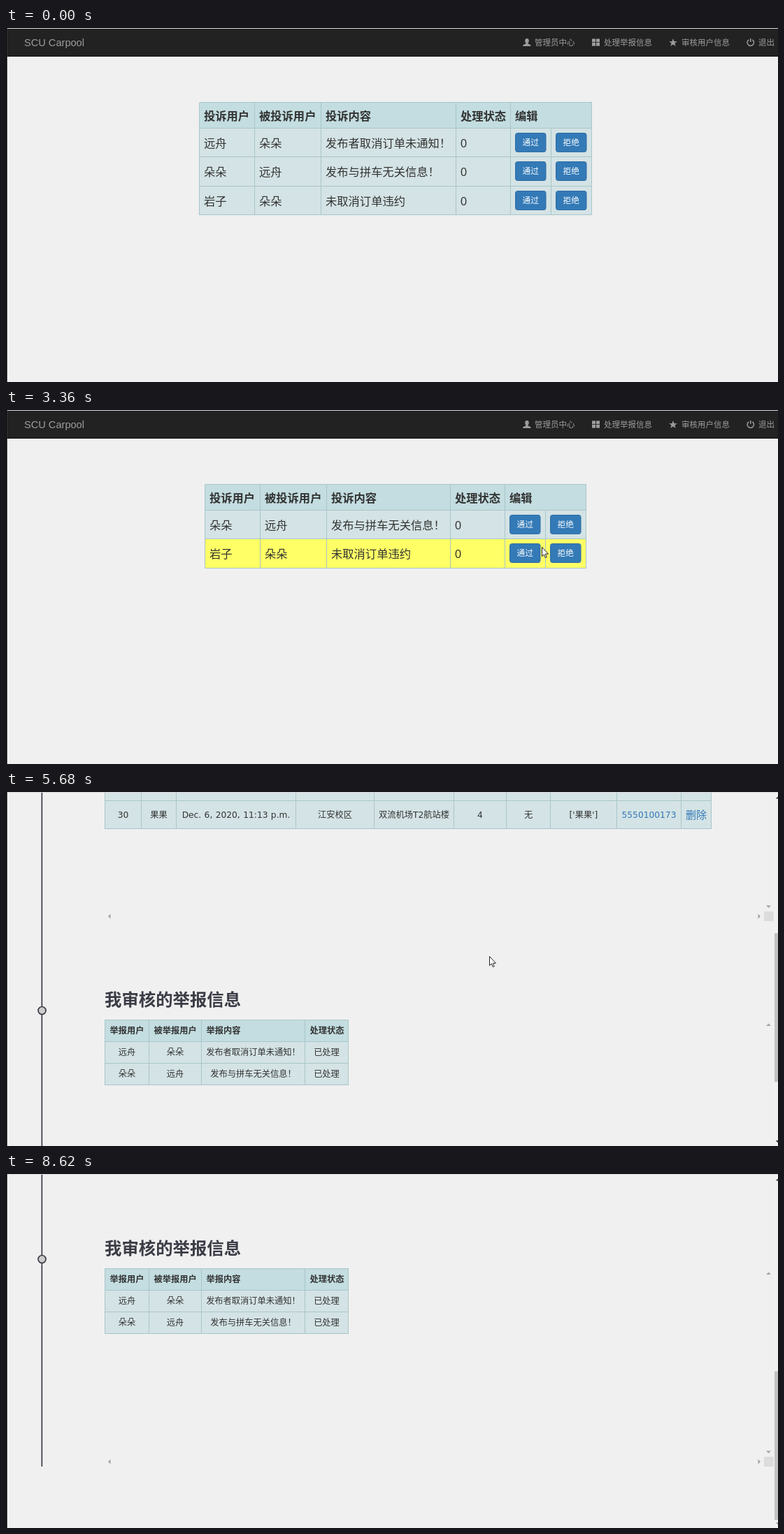
Write an HTML page that moves like this. It is 1104x507 px and loops after 9.15 s.

```html
<!DOCTYPE html>
<html lang="zh-CN">
<head>
<meta charset="utf-8">
<title>SCU Carpool</title>
<style>
html, body { margin: 0; width: 100%; height: 100%; overflow: hidden; background: #f0f0f0; }
svg { display: block; width: 1104px; height: 507px; }
text { white-space: pre; }
.review { font-family: "Liberation Sans", "Noto Sans CJK SC", sans-serif; }
.center { font-family: "DejaVu Sans", "Noto Sans CJK SC", sans-serif; }
.crisp { shape-rendering: crispEdges; }
</style>
</head>
<body>
<svg id="stage" viewBox="0 0 1104 507"></svg>
<script>
const stage = document.getElementById('stage');
const LOOP = 9150, STEPS = 118;
const HEAD = '#c3dde0', ROW = '#d4e3e5', HOVER = '#ffff66', EDGE = '#a9c6c9';
const INK = '#333', LINK = '#337ab7';

// Pointer path: [step, x, y]
const PATH = [
  [2, 1030, 487], [13, 850, 178], [15, 850, 172],
  [19, 850, 172], [22, 830, 158], [27, 775, 134], [31, 752, 166],
  [41, 752, 166], [43, 766, 196], [46, 797, 169], [51, 797, 169], [52, 690, 140],
  [54, 459, 105], [57, 288, 80], [59, 420, 60], [63, 775, 22], [64, 770, 22],
  [70, 691, 227], [71, 691, 227], [73, 691, 235], [75, 646, 274], [84, 452, 194],
  [87, 411, 190], [89, 395, 178], [90, 395, 178], [95, 300, 205], [98, 260, 234],
  [101, 340, 190], [103, 400, 210], [110, 1080, 492]
];
const SCROLL = [0, 15, 230, 448, 580, 639];

const COMPLAINTS = [
  ['远舟', '朵朵', '发布者取消订单未通知！', '0'],
  ['朵朵', '远舟', '发布与拼车无关信息！', '0'],
  ['岩子', '朵朵', '未取消订单违约', '0']
];
const USERS = ['果果', '小禾', '远舟', '岩子', '朵朵', 'owner'];
const ORDERS = {
  top: 349, rowH: 40,
  cols: [141.5, 193.5, 243.5, 414.5, 526.5, 640.5, 715.5, 778.5, 873.5, 965.5, 1008.5],
  head: ['订单id', '用户名', '出发时间', '出发地', '目的地', '剩余座位数', '附加信息', '参与用户', '联系方式', '编辑'],
  rows: [
    ['27', '岩子', 'Dec. 5, 2020, 11:10 p.m.', '四川大学江安校区', '四川大学望江校区', '3', '123', "['岩子']", '555010042', '删除'],
    ['29', '岩子', 'Dec. 6, 2020, 11:10 p.m.', '四川大学华西校区', '成都东火车站', '3', '无', "['岩子', '果果']", '555010042', '删除'],
    ['30', '果果', 'Dec. 6, 2020, 11:13 p.m.', '江安校区', '双流机场T2航站楼', '4', '无', "['果果']", '5550100173', '删除']
  ]
};
const REPORTS = {
  top: 774, rowH: 31,
  cols: [141.5, 204.5, 279.5, 427.5, 489.5],
  head: ['举报用户', '被举报用户', '举报内容', '处理状态'],
  rows: COMPLAINTS.slice(0, 2).map(r => [...r.slice(0, 3), '已处理'])
};

const rect = (x, y, w, h, fill, extra = '') =>
  `<rect x="${x}" y="${y}" width="${w}" height="${h}" fill="${fill}" ${extra}/>`;
const path = (d, fill, extra = '') => `<path d="${d}" fill="${fill}" ${extra}/>`;
const lines = (d, color = EDGE) => path(d, 'none', `stroke="${color}" class="crisp"`);
// Text is placed by its vertical centre
const text = (x, cy, s, size, fill, extra = '') =>
  `<text x="${x}" y="${cy + size * 0.37}" font-size="${size}" fill="${fill}" ${extra}>${s}</text>`;
const BOLD = 'font-weight="700"', MID = 'text-anchor="middle"';
const inside = (p, x, y, w, h) => p && p.x >= x && p.x < x + w && p.y >= y && p.y < y + h;

function pointer(k) {
  const i = PATH.findIndex(p => p[0] >= k);
  if (k < PATH[0][0] || i < 0) return null;
  const b = PATH[i], a = PATH[Math.max(0, i - 1)];
  const u = a === b ? 0 : (k - a[0]) / (b[0] - a[0]);
  return { x: a[1] + (b[1] - a[1]) * u, y: a[2] + (b[2] - a[2]) * u, hand: false };
}

function cursor(p) {
  if (!p) return '';
  const d = p.hand
    ? 'M-1.7 1.3Q0-1 1.7 1.3V7Q3.2 6 4.4 7.6Q6 6.6 6.8 8.5Q8.6 8 8.6 10.5V14L7 20H0L-5 12.5Q-6 9.8-4 9.8L-1.7 12Z'
    : 'M.5.5V13.6L3.4 10.9 5.3 15.6 7.3 14.7 5.3 10.2H9.5Z';
  return `<g transform="translate(${p.x} ${p.y})">${path(d, '#fff', 'stroke="#222" stroke-linejoin="round"')}</g>`;
}

function icon(kind, x, fill) {
  const art = [
    () => path('M6 0C8 0 9 1.5 8.8 3.6 8.6 5.4 7.7 6.3 7.4 7 7.4 8.2 11.7 8.2 11.7 11H0C0 8.2 4.5 8.2 4.5 7 4.2 6.3 3.3 5.4 3.2 3.6 3 1.5 4 0 6 0Z', fill),
    () => [0, 6].map(a => [0.5, 6].map(b => rect(a, b, 5, 4.7, fill)).join('')).join(''),
    () => path('M6 0L7.5 4.2H12L8.4 6.8 9.7 11 6 8.4 2.3 11 3.6 6.8 0 4.2H4.5Z', fill),
    () => path('M3.3 1.8A4.7 4.7 0 1 0 8.3 1.8M5.8 0V5', 'none', `stroke="${fill}" stroke-width="1.5"`)
  ][kind]();
  return `<g transform="translate(${x} 15)">${art}</g>`;
}

function nav(dx, p) {
  const items = [['管理员中心', 739, 756], ['处理举报信息', 838, 855], ['审核用户信息', 948, 966], ['退出', 1059, 1076]];
  let out = rect(1.5, 0, 1103, 41, '#222') + rect(1.5, 40.2, 1103, 0.8, '#0c0c0c');
  out += text(26, 20.5, 'SCU Carpool', 14.6, '#9d9d9d');
  items.forEach(([label, ix, tx], i) => {
    const over = inside(p, ix - dx - 6, 0, tx - ix + label.length * 11.5 + 12, 41);
    if (over) p.hand = true;
    const color = over ? '#fff' : '#9d9d9d';
    out += icon(i, ix - dx, color) + text(tx - dx, 20.5, label, 11.5, color);
  });
  return out;
}

function button(x, y, label, p, pressed) {
  const over = inside(p, x, y, 44, 28);
  if (over) p.hand = true;
  const focus = over && pressed;
  let out = rect(x + .5, y + .5, 43.5, 27, over ? '#286090' : LINK, `rx="3" stroke="${over ? '#204d74' : '#2e6da4'}"`);
  if (focus) {
    out += rect(x + .5, y + .5, 43.5, 27, 'none', 'rx="3.5" stroke="#fff"');
    out += rect(x + 2, y + 2, 40.5, 24, 'none', 'rx="2.5" stroke="#101010" stroke-width="2"');
  }
  return out + text(x + 22.2, y + 14, label, 11.7, '#fff', MID + ' font-weight="500"');
}

function complaints(rows, p, pressed) {
  const longest = Math.max(...rows.map(r => r[2].length));
  const c = 13.9 + 16.26 * longest, w = 368 + c;
  const left = Math.round(557 - w / 2) - .5;
  const xs = [0, 79, 174, 174 + c, 252.5 + c, 310.5 + c, w].map(v => left + Math.round(v));
  const right = xs[6], ys = [106.5, 143.5];
  rows.forEach((r, i) => ys.push([184.5, 226.5, 267.5][i]));
  const bottom = ys[ys.length - 1];
  let out = rect(left, 106.5, right - left, 37, HEAD), labels = '';
  ['投诉用户', '被投诉用户', '投诉内容', '处理状态', '编辑'].forEach((s, i) => {
    labels += text(xs[i] + 6.5, 126, s, 16.3, INK, BOLD);
  });
  rows.forEach((r, i) => {
    const y = ys[i + 1], h = ys[i + 2] - y, cy = 165 + i * 41.4;
    out += rect(left, y, right - left, h, inside(p, left, y, right - left, h) ? HOVER : ROW);
    r.forEach((s, j) => { labels += text(xs[j] + 6.5, cy, s, 16.3, INK); });
    const by = Math.round(cy - 15);
    labels += button(xs[4] + 6.5, by, '通过', p, pressed) + button(xs[5] + 6.5, by, '拒绝', p, pressed);
  });
  const rules = xs.map((x, i) => `M${x} ${i === 5 ? 143.5 : 106.5}V${bottom}`).join('') +
    ys.map(y => `M${left} ${y}H${right}`).join('');
  return out + lines(rules) + labels;
}

function grid(t, p) {
  const { top, rowH, cols, head, rows } = t;
  const left = cols[0], right = cols[cols.length - 1], w = right - left, first = top + 31;
  let out = rect(left, top, w, 31, HEAD), labels = '';
  head.forEach((s, i) => { labels += text(cols[i] + 7, top + 15.8, s, 12.25, INK, BOLD); });
  rows.forEach((r, i) => {
    const y = first + i * rowH;
    out += rect(left, y, w, rowH, inside(p, left, y, w, rowH) ? HOVER : ROW);
    r.forEach((s, j) => {
      const size = s === '删除' ? 15 : 12.25;
      const color = j > 7 ? LINK : INK;
      labels += text((cols[j] + cols[j + 1]) / 2, y + rowH / 2, s, size, color, MID + ' word-spacing=".5"');
    });
  });
  const bottom = first + rows.length * rowH + .5;
  let d = cols.map(x => `M${x} ${top}V${bottom}`).join('') + `M${left} ${top + .5}H${right}`;
  for (let i = 0; i <= rows.length; i++) d += `M${left} ${first + i * rowH + .5}H${right}`;
  return out + lines(d) + labels;
}

// Arrows and corner of an inner scroll box
function scrollBox(top) {
  const y = top + 277;
  return path(`M1087 ${top + 9}h7l-3.5-3.5zM1087 ${top + 261.5}h7l-3.5 3.5z` +
    `M149.5 ${y - 3.5}v7l-3.5-3.5zM1075.5 ${y - 3.5}v7l3.5-3.5z`, '#a3a3a3') +
    rect(1084, top + 270, 13.5, 14, '#dcdcdc');
}

function center(k, p) {
  const s = SCROLL[Math.max(0, Math.min(5, k - 70))];
  const q = p && { x: p.x, y: p.y + s, hand: false };
  let out = nav(15, q);
  out += rect(50.5, 142, 1.7, 916, '#3b3c46');
  [173, 336, 761].forEach(y => {
    out += `<circle cx="51.5" cy="${y}" r="5.5" fill="#ccc" stroke="#3b3c46" stroke-width="1.7"/>`;
  });
  [['所有用户', 157], ['所有订单', 320], ['我审核的举报信息', 745]].forEach(([h, y]) => {
    out += text(141, y, h, 24.4, '#3b3c46', BOLD);
  });
  USERS.forEach((u, i) => { out += text(141 + i * 66.6, 198, u, 16.3, LINK); });
  [ORDERS, REPORTS].forEach(t => { out += grid(t, q) + scrollBox(t.top); });
  if (q) p.hand = q.hand;
  return `<g class="center"><g transform="translate(0 ${-s})">${out}</g></g>` +
    rect(1098, 0, 6, 507, '#f1f1f1') +
    rect(1099, 14 + s * .42, 5, 213, '#c1c1c1') +
    path('M1100.5 9.5H1104V6.5Z', '#333') +
    path('M1100.5 499H1104V502.5Z', s > 638 ? '#a3a3a3' : '#333');
}

function draw(k) {
  const p = pointer(k);
  let page;
  if (k < 64) {
    const rows = COMPLAINTS.slice(k < 36 ? 0 : k < 50 ? 1 : 2);
    const pressed = (k >= 33 && k < 36) || (k >= 48 && k < 50);
    page = `<g class="review">${nav(0, p)}${complaints(rows, p, pressed)}</g>`;
  } else {
    page = center(k, p);
  }
  stage.innerHTML = rect(0, 0, 1104, 507, '#f0f0f0') + page +
    rect(0, 0, 1104, 1, '#d9d9d9') + rect(0, 0, 1.6, 507, '#000') + cursor(p);
}

let shown = -1;
function tick() {
  const k = Math.floor(performance.now() % LOOP / LOOP * STEPS);
  if (k !== shown) draw(shown = k);
  requestAnimationFrame(tick);
}
tick();
</script>
</body>
</html>
```
